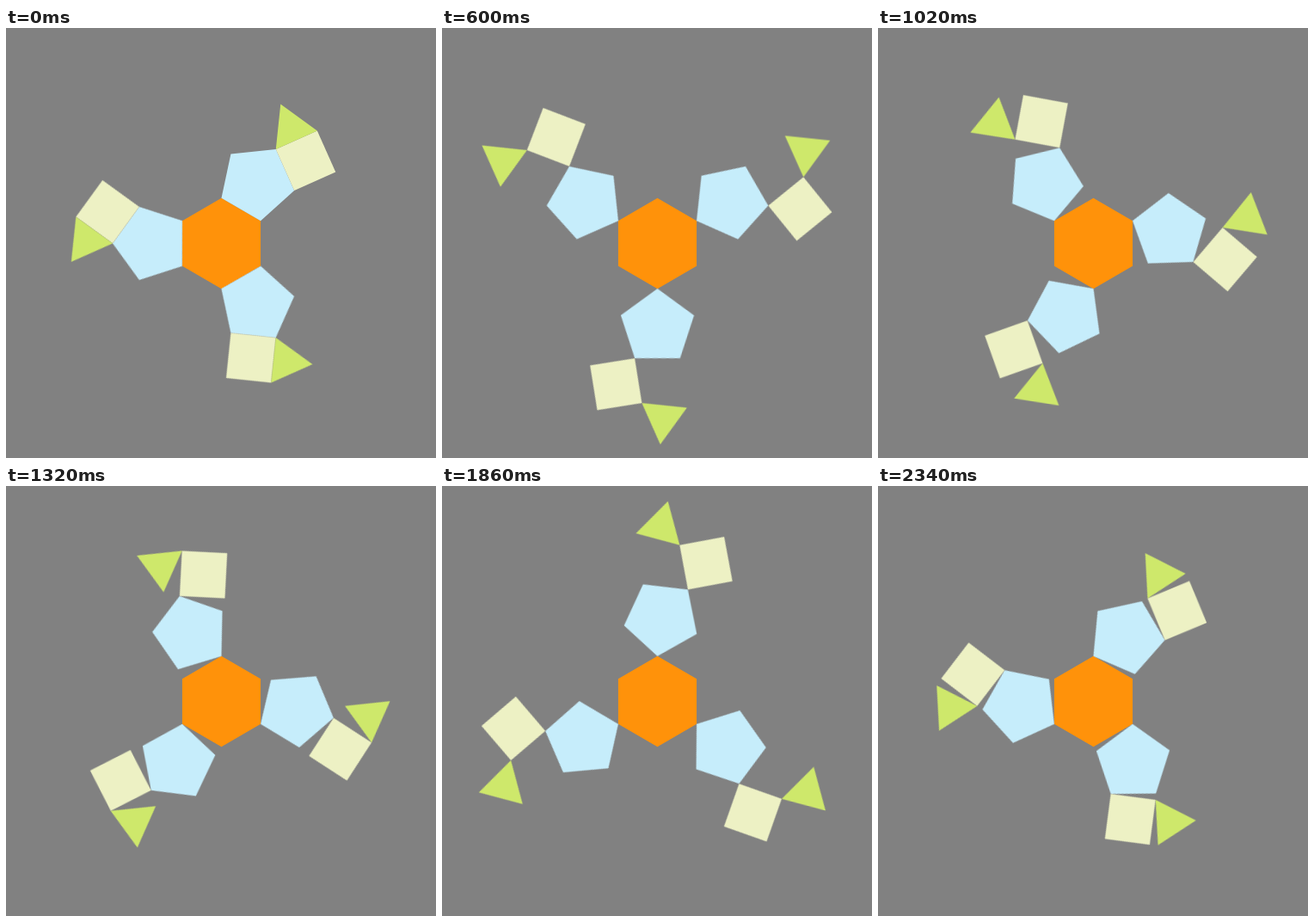
These frames come from a looping animation (500x500 px, 2.4 s). An HTML page:

```html
<!DOCTYPE html>
<html lang="en">
<head>
<meta charset="utf-8">
<title>Rolling polygons</title>
<style>
  html, body { margin: 0; width: 100%; height: 100%; overflow: hidden; background: #818181; }
  svg { display: block; width: 100%; height: 100%; }
  /* The small head start keeps each step clear of its boundary. */
  .first, .second { animation: 2400ms -4ms infinite; }
  .first { animation-name: first; }
  .second { animation-name: second; }
  @keyframes first {
    0% { transform: rotate(0deg); animation-timing-function: steps(20); }
    50%, 100% { transform: rotate(var(--turn)); }
  }
  @keyframes second {
    0%, 50% { transform: rotate(0deg); animation-timing-function: steps(20); }
    100% { transform: rotate(var(--turn)); }
  }
</style>
</head>
<body>
<svg viewBox="0 0 500 500"></svg>
<script>
const svg = document.querySelector('svg');
const CENTER = 250.5, SIDE = 52.63;

function add(parent, tag, attrs) {
  const el = document.createElementNS('http://www.w3.org/2000/svg', tag);
  for (const key in attrs) el.setAttribute(key, attrs[key]);
  return parent.appendChild(el);
}

// Corners of the regular n-gon that starts with edge a-b, counterclockwise.
function ring(a, b, n) {
  const points = [a];
  const start = Math.atan2(b[1] - a[1], b[0] - a[0]);
  for (let i = 0; i < n - 1; i++) {
    const angle = start - i * 2 * Math.PI / n;
    const [x, y] = points[i];
    points.push([x + SIDE * Math.cos(angle), y + SIDE * Math.sin(angle)]);
  }
  return points;
}

const draw = (parent, points, fill) =>
  add(parent, 'polygon', { points: points.map(p => p.map(v => v.toFixed(3))).join(' '), fill });

function hinge(parent, name, [x, y], turn) {
  return add(parent, 'g', {
    class: name,
    style: `transform-origin: ${x}px ${y}px; --turn: ${turn}deg`
  });
}

// A shape that tips over one corner, then over the next.
function roller(parent, points, from, to, turn, fill) {
  const outer = hinge(parent, 'first', points[from], turn);
  const inner = hinge(outer, 'second', points[to], turn);
  draw(inner, points, fill);
  return inner;
}

const top0 = [CENTER, CENTER - SIDE];
const right0 = [CENTER + SIDE * Math.sqrt(3) / 2, CENTER - SIDE / 2];
const left0 = [2 * CENTER - right0[0], right0[1]];

const hexagon = ring(top0, left0, 6);
const pentagon = ring(top0, right0, 5);
const square = ring(pentagon[3], pentagon[2], 4);
const triangle = ring(square[0], square[3], 3);

draw(svg, hexagon, '#ff920a');
for (let i = 0; i < 3; i++) {
  const arm = add(svg, 'g', { transform: `rotate(${i * 120} ${CENTER} ${CENTER})` });
  const five = roller(arm, pentagon, 1, 2, 132, '#c6edfb');
  const four = roller(five, square, 0, 3, -162, '#edf1c4');
  roller(four, triangle, 1, 2, 210, '#cee86b');
}
</script>
</body>
</html>
```
